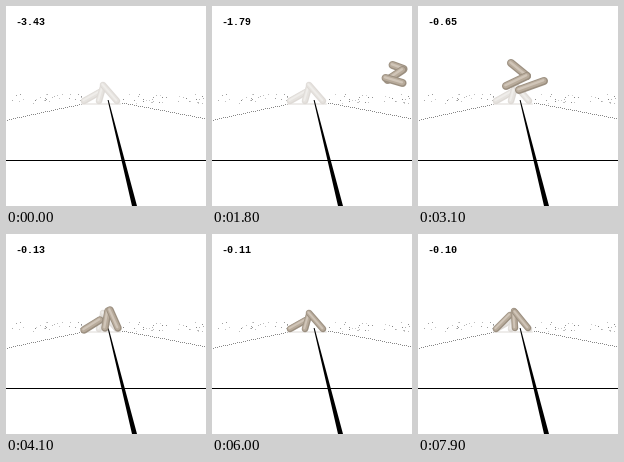
A matplotlib script for the animation above (8000 ms loop, 200 by 200 pixels).

```python
import numpy as np
import matplotlib.pyplot as plt
from matplotlib.animation import FuncAnimation

SIZE, DPI, FRAMES, STEP = 200, 100, 80, 100
PX = 72 / DPI

fig = plt.figure(figsize=(SIZE / DPI, SIZE / DPI), dpi=DPI, facecolor="white")
ax = fig.add_axes([0, 0, 1, 1])
ax.set(xlim=(0, SIZE), ylim=(SIZE, 0))
ax.axis("off")

# Limb strokes from wide and dark to narrow and light
WIDTHS = (1, 0.7, 0.3)
SOLID = ("#9b8f80", "#b8ab9b", "#d0c5b8")
PALE = ("#dedad6", "#e6e3df", "#efedea")

# Three limbs per pose as x1, y1, x2, y2: landing, tumbling, kneeling, resting
TIMES = (2.3, 3.1, 4.1, 6, 7.9)
POSES = np.array([
    (127, 76, 138, 80, 137, 81, 122, 91, 120, 89, 137, 94),
    (93, 57, 109, 70, 109, 70, 88, 80, 101, 84, 126, 75),
    (78, 96, 94, 86, 102, 77, 99, 94, 104, 76, 112, 94),
    (78, 95, 94, 86, 97, 81, 93, 95, 97, 79, 111, 95),
    (78, 95, 92, 81, 96, 77, 97, 94, 97, 78, 110, 94),
])
SCORE_TIMES = (0, 1.2, 2.3, 3.1, 4.1, 6, 7.9)
SCORES = (-3.43, -2.82, -0.94, -0.65, -0.13, -0.11, -0.10)


def make_limbs(colors, z):
    """One stack of round strokes per limb."""
    return [[ax.plot([], [], color=c, solid_capstyle="round", zorder=z + k)[0]
             for c in colors] for k in range(3)]


def place(limbs, coords, width):
    for limb, (x1, y1, x2, y2) in zip(limbs, np.reshape(coords, (3, 4))):
        for line, w in zip(limb, WIDTHS):
            shift = 1 - w
            line.set_data([x1 - shift, x2 - shift], [y1 - shift, y2 - shift])
            line.set_linewidth(width * w * PX)


def dots(x, y, colors):
    ax.scatter(np.floor(x) + 0.5, np.floor(y) + 0.5, s=PX ** 2, marker="s",
               c=colors, linewidths=0, zorder=1)


def draw_floor():
    ax.axhspan(154, 155, color="black", lw=0)
    ax.fill([101.6, 102.6, 131, 126], [94, 94, 200, 200], color="black", lw=0,
            zorder=3)
    left, right = np.arange(0, 77, 2), np.arange(115, 200, 2)
    dots(left, 113 - left * 0.212, "#888888")
    dots(right, 96 + (right - 115) * 0.19, "#888888")
    rng = np.random.default_rng(4)
    x = np.concatenate([rng.uniform(0, 80, 34), rng.uniform(114, 200, 36)])
    y = 88 + 10 * rng.random(x.size)
    dots(x, y, [str(g) for g in rng.uniform(0.5, 0.82, x.size)])
    ax.plot([76, 114], [98, 98], color="#e9e7e4", lw=1.5 * PX, zorder=1)


def pose_at(t):
    """Drift in from the right, land, then settle with a slight wobble."""
    pose = np.array([np.interp(t, TIMES, col) for col in POSES.T])
    early = max(0, TIMES[0] - t)
    pose[0::2] += np.interp(early, (0, 0.4, 1.1, 2.3), (0, 49, 81, 150))
    pose[1::2] -= 34 * early
    if t > TIMES[2]:
        pose[10] += 2 * np.sin(np.pi * (t - 4.1) / 0.95) ** 2
    return pose


def score_at(t):
    wobble = 0.03 * np.sin(np.pi * (t - 4.1) / 0.95) if t > 4.1 else 0
    return np.interp(t, SCORE_TIMES, SCORES) + wobble


draw_floor()
ghost = make_limbs(PALE, 5)
walker = make_limbs(SOLID, 10)
place(ghost, POSES[3], 6.5)
label = ax.text(9, 19, "", family="Liberation Mono", weight="bold",
                size=10 * PX, va="baseline", color="black", zorder=20)


def update(i):
    t = i * STEP / 1000
    place(walker, pose_at(t), np.interp(t, (3.1, 6), (8, 6.5)))
    label.set_text(f"{score_at(t):.2f}")
    return [label]


anim = FuncAnimation(fig, update, frames=FRAMES, interval=STEP, repeat=True,
                     repeat_delay=0, blit=False)
plt.show()
```
